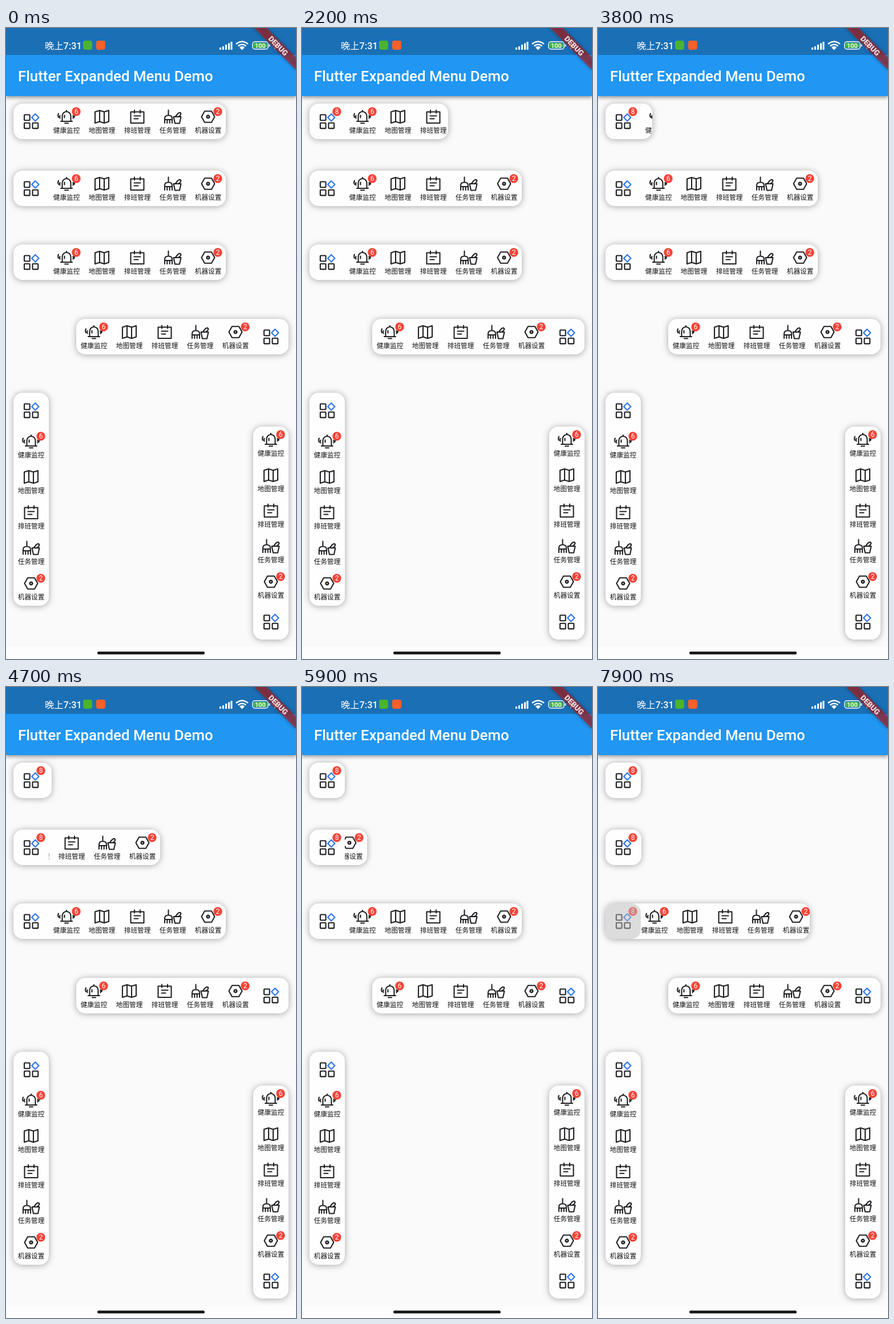
Animation of 508x1102 px, one loop 8 s. Source, as an HTML page:

```html
<!DOCTYPE html>
<html lang="zh-CN">
<head>
<meta charset="utf-8">
<title>Expanded menu</title>
<style>
html, body { margin: 0; width: 100%; height: 100%; overflow: hidden; background: #fafafa; }
#stage { position: relative; width: 508px; height: 1102px; overflow: hidden; background: #fafafa; }
#stage > * { position: absolute; }
svg { display: block; flex: none; }
.bar { left: 0; top: 0; width: 508px; height: 119px; background: #2196f3; box-shadow: 0 3px 6px rgba(0,0,0,.38); }
.menu { border-radius: 16px; background: #fefefe; box-shadow: 0 1px 12px rgba(0,0,0,.34); }
.inner { position: absolute; inset: 0; border-radius: 16px; overflow: hidden; }
.button, .window { position: absolute; }
.window { overflow: hidden; }
.items { position: absolute; display: flex; }
.ink { position: absolute; inset: 0; border-radius: 16px; background: #bcbcbc; opacity: 0; }
.icon { fill: none; stroke: #202124; stroke-width: 2.1; stroke-linecap: round; stroke-linejoin: round; }
.label { font: 11.64px "Noto Sans CJK SC", "Noto Sans CJK", sans-serif; fill: #111; text-anchor: middle; }
.count { font: 12px Roboto, sans-serif; fill: #fff; text-anchor: middle; }
</style>
</head>
<body>
<div id="stage">
  <div class="bar"></div>
  <svg width="508" height="1102">
    <rect width="508" height="47" fill="#1a6fb5"/>
    <text x="21" y="92.5" fill="#fff" font-family="Roboto, sans-serif" font-weight="500" font-size="25.87">Flutter Expanded Menu Demo</text>
    <text x="68" y="36.5" fill="#fff" font-family="Roboto, 'Noto Sans CJK SC', 'Noto Sans CJK', sans-serif" font-weight="500" font-size="16.3">晚上7:31</text>
    <rect x="135" y="22" width="16" height="16" rx="4" fill="#4bb32f"/>
    <rect x="158" y="22" width="16" height="16" rx="4" fill="#f9602b"/>
    <path d="M375.5 38v-4M380.5 38v-6M385.5 38v-9M390.5 38v-11.500M395 38v-14" stroke="#fff" stroke-width="3"/>
    <g fill="none" stroke="#fff" stroke-width="2.3">
      <path d="M403 28q10.500-8.500 21 0M406.500 31.500q7-5.500 14 0M410 34.500q3.500-2.500 7 0"/>
      <rect x="432" y="24" width="27" height="13" rx="4" stroke-width="1.5"/>
      <path d="M461.500 28.500v4" stroke-width="2"/>
    </g>
    <path d="M409 34l4.500 4.500 4.500-4.500q-4.500-3-9 0z" fill="#fff"/>
    <rect x="434" y="26" width="23" height="9" rx="2" fill="#43b83f"/>
    <text x="445.500" y="34.600" fill="#fff" text-anchor="middle" font-family="Roboto, sans-serif" font-weight="500" font-size="11">100</text>
    <path d="M473 23l-6 8.500h4l-1 6.500 7-9h-4.500z" fill="#fff"/>
    <rect y="1081" width="508" height="21" fill="#fdfdfd"/>
    <rect x="160" y="1089" width="188" height="5" rx="2.5" fill="#1d1d1d"/>
  </svg>
</div>
<script>
const CELL = 62, SPAN = 5 * CELL, LOOP = 8000;
const stage = document.getElementById('stage');

const icons = {
  bell: `<path d="M-7.500 8V-1.500a7.500 7.500 0 0 1 15 0V8M-10 8H10M0-9.500v-1.500M-3 11.200H3M-3.500-2.500V1.500M-11.500-2q-1 2.500 0 4.500M-14-5.500q-1.700 3.500 0 6.500M11.500-2q1 2.500 0 4.500M13.500-5q1.500 3 0 6"/>`,
  map: `<path d="M-12-8.500l8-2.500 8 2.500 8-2.500V8.500L4 11l-8-2.500-8 2.500zM-4-11V8.500M4-8.500V11"/>`,
  plan: `<path d="M-11.500-8.500h23V11h-23zM-5-11.500v5M5-11.500v5M-5.500-1.500h11M-5.500 3.500h7"/>`,
  clean: `<path d="M-7.500-11.500v9M-14 11V3q0-5.500 6.500-5.500T-1 3V11M-14 5H-1M-9.700 5v6M-5.300 5v6M1.500 0H14.500L12 11.500H4zM4.500 0L9-5.500q3-2.500 5-1 1 2.500-1.500 4.500L9.500 0"/>`,
  gear: `<path d="M-11.500 0L-6-9.700H6L11.500 0 6 9.700H-6z"/><circle r="2.300" stroke-width="2.600"/>`
};
const entries = [['bell', '健康监控', 6], ['map', '地图管理'], ['plan', '排班管理'],
                 ['clean', '任务管理'], ['gear', '机器设置', 2]];

const badge = n => n ? `<g class="badge"><circle cx="17" cy="-17" r="7.700" fill="#f44336"/>
  <text class="count" x="17" y="-12.800">${n}</text></g>` : '';
const cell = body => `<svg width="62" height="62" viewBox="-31 -31 62 62">${body}</svg>`;
const itemCells = entries.map(([icon, label, n]) => cell(
  `<g class="icon" transform="translate(0 -8)">${icons[icon]}</g>
   <text class="label" y="20.300">${label}</text>${badge(n)}`)).join('');
const buttonCell = cell(`<g class="icon">
  <rect x="-12" y="-11.500" width="9.700" height="9.700" rx="1"/>
  <rect x="-12" y="2.700" width="9.700" height="9.700" rx="1"/>
  <rect x="2.500" y="2.700" width="9.700" height="9.700" rx="1"/>
  <path d="M7.300-13l6.200 6.200-6.200 6.200-6.200-6.200z" stroke="#2f74eb"/></g>${badge(8)}`);

function addMenu(x, y, vertical, buttonLast) {
  const el = document.createElement('div');
  const side = vertical ? 'top' : 'left', back = vertical ? 'bottom' : 'right';
  const [near, far] = buttonLast ? [0, CELL] : [CELL, 0];
  el.className = 'menu';
  el.style.cssText = `left:${x}px;top:${y}px;width:${vertical ? CELL : CELL + SPAN}px;height:${vertical ? CELL + SPAN : CELL}px`;
  el.innerHTML = `<div class="inner">
    <div class="window" style="inset:0;${side}:${near}px;${back}:${far}px">
      <div class="items" style="flex-direction:${vertical ? 'column' : 'row'}">${itemCells}</div></div>
    <div class="button" style="${side}:${buttonLast ? SPAN : 0}px">${buttonCell}<div class="ink"></div></div></div>`;
  stage.append(el);
  const find = s => el.querySelector(s);
  const menu = { el, items: find('.items'), ink: find('.ink'), total: find('.button .badge') };
  menu.total.style.display = 'none';
  return menu;
}

// start: seconds at which the panel begins to close; anchor: share of the lost width the items move by
const closing = [
  { ...addMenu(13, 132), start: 1.75, anchor: 0 },
  { ...addMenu(13, 248.5), start: 4.31, anchor: 1 },
  { ...addMenu(13, 378), start: 7.86, anchor: .5 }
];
addMenu(122.5, 507.5, false, true);
addMenu(13, 637, true);
addMenu(433, 695.5, true, true);

stage.insertAdjacentHTML('beforeend', `<svg width="508" height="119">
  <g transform="translate(508 0) rotate(45)">
    <rect x="-51.700" y="36.200" width="103.500" height="15.500" fill="#b71c1c" fill-opacity=".63" style="filter:drop-shadow(0 0 3px rgba(0,0,0,.5))"/>
    <text y="48.700" fill="#fff" fill-opacity=".85" text-anchor="middle" font-family="Roboto, sans-serif" font-weight="900" font-size="13.200">DEBUG</text>
  </g></svg>`);

const clamp = v => Math.min(1, Math.max(0, v));

function draw(now) {
  const time = now % LOOP / 1000;
  for (const { el, items, ink, total, start, anchor } of closing) {
    const t = time - start;
    const open = t < 0 ? 1 : t > 4.1 ? 0 : Math.exp(-1.147 * t - .097 * t * t);
    el.style.width = CELL + SPAN * open + 'px';
    items.style.left = SPAN * (open - 1) * anchor + 'px';
    total.style.display = t < 0 ? 'none' : '';
    ink.style.opacity = .5 * Math.min(clamp((t + .17) / .2), clamp((.35 - t) / .25));
  }
  requestAnimationFrame(draw);
}
requestAnimationFrame(draw);
</script>
</body>
</html>
```
